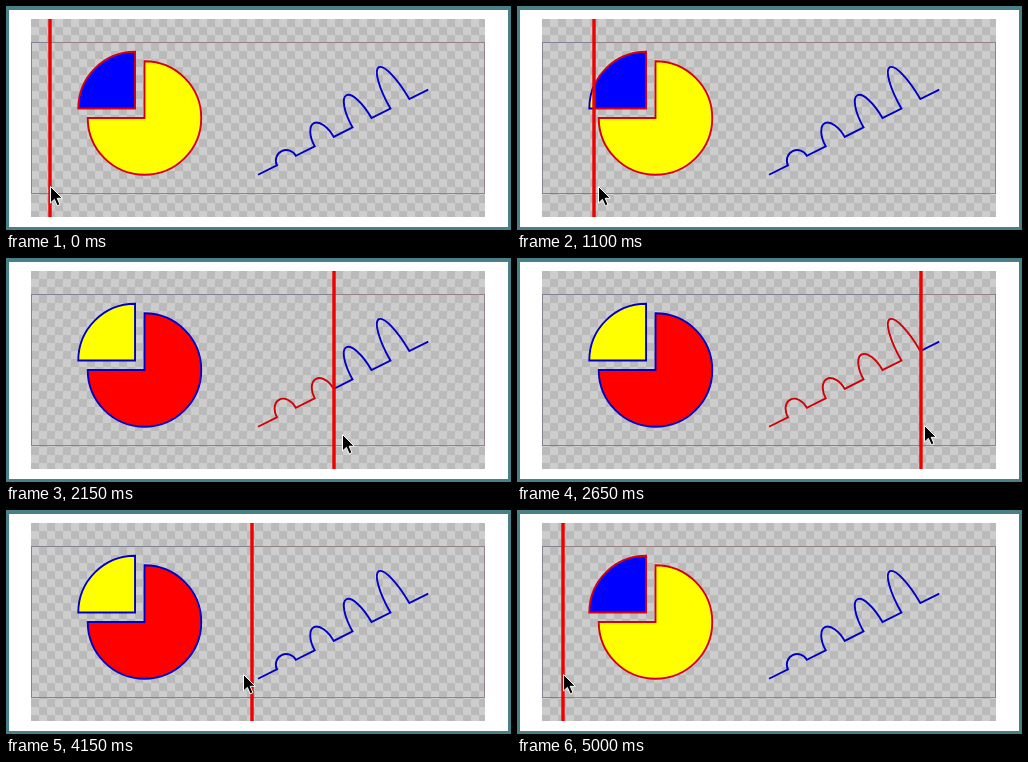
Recreate the animation shown at these times as an HTML page. Size 505x224 px, loop 5050 ms.

```html
<!DOCTYPE html>
<html lang="en">
<head>
<meta charset="utf-8">
<title>Swipe comparison</title>
<style>
  html, body { margin: 0; width: 100%; height: 100%; overflow: hidden; background: #478187; }
  svg { display: block; }
</style>
</head>
<body>
<svg width="505" height="224" viewBox="0 0 505 224">
  <defs>
    <pattern id="checker" x="25" y="13" width="16" height="16" patternUnits="userSpaceOnUse">
      <path d="M0 0h16v16H0z" fill="#bababa"/>
      <path d="M8 0h8v8H8zM0 8h8v8H0z" fill="#cdcdcd"/>
    </pattern>
    <clipPath id="before"><rect id="left" height="224"/></clipPath>
    <clipPath id="after"><rect id="right" width="505" height="224"/></clipPath>
  </defs>
  <rect x="3" y="4" width="499" height="217" fill="#fff"/>
  <rect x="25" y="13" width="454" height="198" fill="url(#checker)"/>
  <g id="imageA" clip-path="url(#before)"></g>
  <g id="imageB" clip-path="url(#after)"></g>
  <rect id="bar" x="-1.7" y="13" width="3.4" height="198" fill="#f00000"/>
  <path id="cursor" d="M.5 .5V17L4.4 13.4L7.2 19.8L10 18.6L7.2 12.3H12.3Z" fill="#000" stroke="#fff"/>
</svg>
<script>
const $ = id => document.getElementById(id);

// Four bumps on a rising line; only their heights differ between the images.
const bumps = heights => 'M600,350l50,-25' +
  heights.map(h => `a25,${h} -30 0,1 50,-25l50,-25`).join('');

const picture = (pie, slice, edge, line, frame, heights) => `
  <rect x="25.5" y="36.5" width="453" height="151" fill="none" stroke="${frame}" stroke-opacity=".85"/>
  <g transform="translate(25 36.33) scale(.37833)" stroke-width="5" stroke="${edge}">
    <path d="M300,200h-150a150,150 0 1,0 150,-150z" fill="${pie}"/>
    <path d="M275,175v-150a150,150 0 0,0 -150,150z" fill="${slice}"/>
    <path d="${bumps(heights)}" fill="none" stroke="${line}"/>
  </g>`;

$('imageA').innerHTML = picture('#f00', '#ff0', '#0000c8', '#d00008', '#777889', [35, 40, 55, 100]);
$('imageB').innerHTML = picture('#ff0', '#00f', '#d80010', '#0000c8', '#8e7878', [25, 50, 75, 100]);

const LOOP = 5050, STEP = 50, LEAD = 30;

// Drag to the right, rest, drag back: time and bar position.
const stops = [[600, 44], [1125, 80], [1700, 200], [2250, 350], [2650, 404],
  [3050, 440], [3650, 440], [4150, 246], [5000, 46]];

const slope = i => (stops[i + 1][1] - stops[i][1]) / (stops[i + 1][0] - stops[i][0]);

// Monotone tangent: harmonic mean of the neighbouring slopes, zero at rests.
function tangent(i) {
  if (i === 0 || i === stops.length - 1) return 0;
  const a = slope(i - 1), b = slope(i);
  return a * b > 0 ? 2 * a * b / (a + b) : 0;
}

function barAt(time) {
  const t = Math.min(Math.max(time, stops[0][0]), stops.at(-1)[0]);
  const i = Math.max(0, stops.findIndex(s => s[0] >= t) - 1);
  const [[t0, x0], [t1, x1]] = stops.slice(i, i + 2);
  const d = t1 - t0, u = (t - t0) / d, v = 1 - u;
  return v * v * (1 + 2 * u) * x0 + u * u * (3 - 2 * u) * x1
    + d * u * v * (v * tangent(i) - u * tangent(i + 1));
}

const smooth = u => {
  u = Math.min(1, Math.max(0, u));
  return u * u * (3 - 2 * u);
};

const move = (id, x, y) =>
  $(id).setAttribute('transform', `translate(${Math.round(x)} ${Math.round(y)})`);

const start = performance.now();
function draw() {
  const t = Math.floor((performance.now() - start) % LOOP / STEP) * STEP;
  const x = barAt(t);
  $('left').setAttribute('width', x);
  $('right').setAttribute('x', x);
  move('bar', x, 0);
  // The pointer runs slightly ahead of the bar and drifts up on the way right.
  move('cursor', barAt(t + LEAD), 180 - 16 * smooth((t - 1700) / 1350));
  requestAnimationFrame(draw);
}
draw();
</script>
</body>
</html>
```
